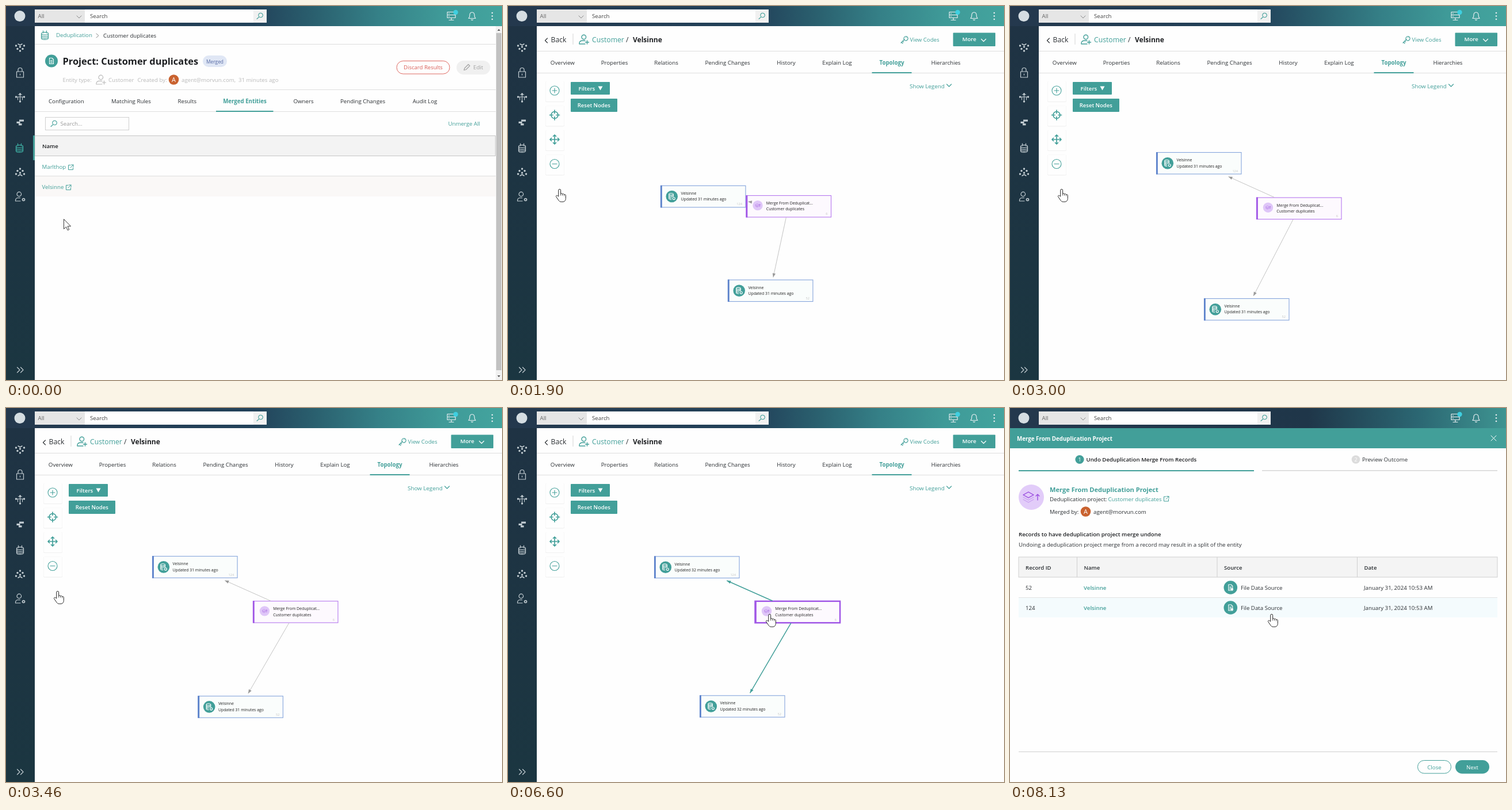
Animation, 862 px wide and 650 px high, one loop 9 s. Source, as an HTML page:

```html
<!DOCTYPE html>
<html lang="en">
<head>
<meta charset="utf-8">
<title>Undo a deduplication merge</title>
<style>
html, body { margin: 0; width: 100%; height: 100%; overflow: hidden; background: #fefefe; }
svg { display: block; width: 862px; height: 650px; font-family: "Open Sans", "Noto Sans", sans-serif; }
text { white-space: pre; }
</style>
</head>
<body>
<svg id="stage" viewBox="0 0 862 650" xmlns="http://www.w3.org/2000/svg"></svg>
<script>
const LOOP = 9000;
const TEAL = '#429f99', INK = '#2b2f33', DARK = '#1d1f22', LINE = '#dedede';
const PERSON = 'Velsinne', EMAIL = 'agent@morvun.com';

// drawing helpers
const text = (x, y, str, { s = 9.7, c = INK, w = 400, a = 'start' } = {}) =>
  `<text x="${x}" y="${y}" font-size="${s}" fill="${c}" font-weight="${w}" text-anchor="${a}">${str}</text>`;
const rect = (x, y, w, h, fill, extra = '') =>
  `<rect x="${x}" y="${y}" width="${w}" height="${h}" fill="${fill}" ${extra}/>`;
const disc = (x, y, r, fill) => `<circle cx="${x}" cy="${y}" r="${r}" fill="${fill}"/>`;
const icon = (x, y, d, c = TEAL, w = 1.2, k = 1) =>
  `<path transform="translate(${x} ${y}) scale(${k})" d="${d}" fill="none" stroke="${c}" stroke-width="${w}" stroke-linecap="round" stroke-linejoin="round"/>`;
const hline = (x1, x2, y, c = LINE, w = 1) => rect(x1, y, x2 - x1, w, c);
const group = (id, body) => `<g id="${id}">${body}</g>`;

const ICON = {
  chevron: 'M-4-2L0 2L4-2',
  lens: 'M-5 5L-1 1.3M-1.3 1A3.8 3.8 0 1 1 1.2 2.3A3.8 3.8 0 0 1-1.3 1',
  db: 'M-6-3a6 2.4 0 0 0 12 0a6 2.4 0 0 0-12 0v8a6 2.4 0 0 0 12 0v-8M-6 0a6 2.4 0 0 0 12 0M-6 2.7a6 2.4 0 0 0 12 0M-3-8v4M3-8v4',
  link: 'M4 1H.5V9H8.5V5.5M5.5.5H9V4M9 .5L4 5.5',
  person: 'M-4-4a3.8 3.8 0 1 0 7.6 0a3.8 3.8 0 1 0-7.6 0M-8 8v-1.5a5 5 0 0 1 5-4.2H2M-8 8H2M5.5 2v6M2.5 5h6',
  admin: 'M-4-4a3.8 3.8 0 1 0 7.6 0a3.8 3.8 0 1 0-7.6 0M-6.5 8v-1.5a4.5 4.5 0 0 1 4.5-4H1.5M-6.5 8H2',
  key: 'M-5 6L1 0M-4 5l2 2M-2 3l1.5 1.5M.5.5a3.6 3.6 0 1 1 1 1zM3.5-3h.1',
  doc: 'M-3.5-5H1L3.5-2.5V5H-3.5zM-1.5-1H1.5M-1.5 1H1.5M-1.5 3H1.5',
  pencil: 'M-5 5L-4 1.5L2.5-5L5-2.5L-1.5 4z',
  lock: 'M-6-2H6V8H-6zM-3.5-2V-5a3.5 3.5 0 0 1 7 0V-2M0 2V4',
  screen: 'M-7-7H7V-2H-7zM-7-2H7V3H-7zM0 3V7M-4 7H4M-4.5-4.5h1M-4.5.5h1',
  bell: 'M-6 4.5C-4 2.5-4 0-4-2a4 4 0 0 1 8 0C4 0 4 2.5 6 4.5zM-1.5 6.5a1.6 1.6 0 0 0 3 0',
  stack: 'M-9-4L0-9L9-4L0 1zM-9 0L0 5L9 0M-9 4L0 9L9 4',
  record: 'M-5-4a3.8 1.6 0 0 0 7.6 0a3.8 1.6 0 0 0-7.6 0V3.5a3.8 1.6 0 0 0 4 1.6M-5-1.5a3.8 1.6 0 0 0 7.6 0M-5 1a3.8 1.6 0 0 0 4 1.6M2.6-4V0M1.5 3.5a2 2 0 1 0 4 0a2 2 0 1 0-4 0',
  close: 'M-4.5-4.5L4.5 4.5M4.5-4.5L-4.5 4.5'
};

const externalLink = (x, y) => icon(x, y, ICON.link, TEAL, 1);
const avatar = (x, y) => disc(x, y, 8.8, '#c9622f') + text(x, y + 4, 'A', { s: 11, c: '#fff', a: 'middle' });

const tabRow = (names, active, y) => names.map(([x, name]) =>
  text(x, y, name, name === active ? { c: TEAL, w: 700, a: 'middle' } : { a: 'middle' })).join('');

const gradient = (id, stops, extra = '') => `<linearGradient id="${id}" ${extra}>` +
  stops.map(([at, c]) => `<stop offset="${at}" stop-color="${c}"/>`).join('') + '</linearGradient>';

function topBar() {
  const soft = '#e6edf0';
  return '<defs>' +
    gradient('barFill', [[0, '#24384d'], [.5, '#22425a'], [.62, '#2a5f6e'], [.75, '#358087'], [.88, '#3f9a98'], [1, '#43a49e']]) +
    gradient('barDim', [[0, '#24384d'], [.6, '#1f3649'], [.82, '#2b6672'], [1, '#3e9491']]) +
    gradient('sideFill', [[0, '#1f3344'], [1, '#1b3641']], 'x2="0" y2="1"') + '</defs>' +
    rect(0, 0, 862, 35, 'url(#barFill)') + rect(0, 0, 862, 35, 'url(#barDim)', 'id="dimBar"') +
    disc(24, 17.5, 9.5, '#d5dde2') +
    rect(50, 6, 87, 23, '#e6e6e6') + rect(137, 6, 293, 23, '#fefefe') + rect(430, 6, 23, 23, '#f1f1f1') +
    text(55.5, 21, 'All', { c: '#666' }) + icon(127, 19, ICON.chevron, '#888', 1) +
    text(146, 21.3, 'Search', { c: '#444' }) + icon(441, 17.5, ICON.lens, TEAL, 1.1) +
    icon(774, 17.5, ICON.screen, soft, 1.2) + icon(810, 17, ICON.bell, soft, 1.2) +
    [12, 17.5, 23].map(y => disc(845, y, 1.3, soft)).join('') +
    '<circle id="dot" cx="781.5" cy="11" r="4.2" fill="#3fcfe0"/>';
}

function sideBar() {
  const c = '#c4ced3', x = 24.5;
  const dots = (y, pts) => pts.map(([dx, dy]) => disc(x + dx, y + dy, 1.7, c)).join('');
  const fan = (y, dir) => dots(y, [[0, -6], [-4.5, -2.5], [4.5, -2.5], [-7, 3], [7, 3], [0, 1]].map(([dx, dy]) => [dx, dy * dir])) +
    icon(x, y, `M-3.5 ${6 * dir}L0 ${4 * dir}L3.5 ${6 * dir}`, c, 1.5);
  return rect(0, 35, 50, 615, 'url(#sideFill)') +
    fan(72, -1) + icon(x, 116, ICON.lock, c, 1.2) +
    icon(x, 159, 'M-8-1H8M0-6V7M-4-1V4M4-1V4M-3-5H3', c, 1.1) + dots(159, [[0, -6], [-7, -1], [7, -1], [0, 7]]) +
    rect(23, 197.5, 8, 3.2, c) + rect(18.5, 200.8, 6, 3.2, c) + rect(22, 204.2, 5.5, 3.2, c) +
    group('dbActive', rect(47, 225, 3, 43, TEAL) + icon(23.5, 247, ICON.db, '#3fb0a5', 1.2)) +
    group('dbIdle', icon(x, 247, ICON.db, c, 1.2)) +
    fan(289, 1) + icon(23, 331, ICON.admin, c, 1.2) +
    icon(30.5, 336.5, 'M-2 0a2 2 0 1 0 4 0a2 2 0 1 0-4 0', c, 1.6) +
    icon(x, 632.5, 'M-5-4.5L-.5 0L-5 4.5M1-4.5L5.5 0L1 4.5', c, 1.2);
}

function listPage() {
  const pale = { c: '#b9b9b9' }, teal = { c: TEAL };
  return rect(50, 35, 812, 615, '#fefefe') +
    icon(67.5, 51, ICON.db, TEAL, 1.2) + text(87, 54.3, 'Deduplication', teal) +
    icon(159, 51.5, 'M-2-3.5L2 0L-2 3.5', '#888', 1) + text(169, 54.5, 'Customer duplicates', { s: 9.6 }) +
    hline(50, 851, 66) +
    disc(79, 95.5, 11, TEAL) + icon(79, 95.5, ICON.doc, '#fff', 1.1) +
    text(98.5, 101.5, 'Project: Customer duplicates', { s: 16.4, w: 700, c: DARK }) +
    rect(342, 86, 42, 20, '#e0e7f5', 'rx="10"') + text(363, 99.5, 'Merged', { s: 8.4, c: '#5468a3', a: 'middle' }) +
    text(98.5, 132, 'Entity type:', pale) + icon(165, 128, ICON.person, '#b9b9b9', 1.2) + text(178, 132, 'Customer', pale) +
    text(228.5, 132, 'Created by:', pale) + avatar(291.5, 128) +
    text(305, 132, EMAIL + ',', pale) + text(404, 132, '31 minutes ago', pale) +
    rect(679, 95.5, 92, 22.5, '#fefefe', 'rx="11.2" stroke="#df6a62"') + text(725, 110.3, 'Discard Results', { s: 9.55, c: '#d95c55', a: 'middle' }) +
    rect(783, 95, 58.5, 24, '#f0f0f0', 'rx="12"') + icon(801, 106.5, ICON.pencil, '#a2a2a2', 1.2) + text(812, 110.3, 'Edit', { c: '#a2a2a2' }) +
    hline(50, 851, 145) +
    tabRow([[104.8, 'Configuration'], [217.5, 'Matching Rules'], [314.8, 'Results'], [415, 'Merged Entities'], [517, 'Owners'], [620, 'Pending Changes'], [728, 'Audit Log']], 'Merged Entities', 168.8) +
    hline(50, 851, 183) + hline(365, 464.5, 182, TEAL, 2) +
    rect(68.5, 193.5, 145, 22, '#fefefe', 'stroke="#d0d0d0"') + icon(83, 204.5, ICON.lens, TEAL, 1.1) + text(94.5, 208, 'Search...', { c: '#999' }) +
    text(824, 208, 'Unmerge All', { c: TEAL, a: 'end' }) +
    rect(50, 225.5, 800.5, 35, '#f3f3f3', 'stroke="#c6c6c6"') + text(63, 247, 'Name', { s: 9.6, w: 600, c: DARK }) +
    text(62.5, 283.3, 'Marlthop', teal) + externalLink(108, 275.5) + hline(50, 851, 295) +
    rect(50, 296, 801, 35, '#faf8f7') + text(62.5, 318.3, PERSON, teal) + externalLink(104, 310.5) +
    rect(851, 35, 11, 615, '#f1f1f1') + rect(852, 47, 9, 586, '#c1c1c1') +
    '<path d="M854 43h5l-2.500-3zM854 642h5l-2.500 3z" fill="#505050"/>';
}

function entityHeader() {
  return icon(66.5, 60, 'M2-4L-2 0L2 4', INK, 1.1) + text(74.5, 62.8, 'Back', { s: 12.2 }) + rect(112.5, 48, 1, 19, '#d4d4d4') +
    icon(132, 58, ICON.person, TEAL, 1.4) + text(146, 62.8, 'Customer', { s: 12.2, c: TEAL }) +
    text(205, 62.8, '/', { s: 12.2 }) + text(217, 62.8, PERSON, { s: 12, w: 700, c: DARK }) +
    icon(688, 58, ICON.key, TEAL, 1.2) + text(698.5, 61.5, 'View Codes', { s: 9.6, c: TEAL }) +
    rect(773.5, 46.5, 73.5, 23.5, TEAL, 'rx="1"') + text(789.5, 61, 'More', { w: 600, c: '#fff' }) + icon(826.5, 59.5, ICON.chevron, '#fff', 1.2) +
    hline(50, 862, 78) +
    tabRow([[94.8, 'Overview'], [185, 'Properties'], [275, 'Relations'], [381.5, 'Pending Changes'], [483.5, 'History'], [572, 'Explain Log'], [667, 'Topology'], [761, 'Hierarchies']], 'Topology', 101.5) +
    hline(50, 862, 116) + hline(632.5, 701.5, 115, TEAL, 2);
}

function graphTools() {
  const ring = 'M-8 0a8 8 0 1 0 16 0a8 8 0 1 0-16 0';
  const signs = [ring + 'M-4 0H4M0-4V4', 'M-6 0a6 6 0 1 0 12 0a6 6 0 1 0-12 0M-8.5 0H-3M3 0H8.5M0-8.5V-3M0 3V8.5',
    'M-8 0H8M0-8V8M-2.5-5.5L0-8L2.5-5.5M-2.5 5.5L0 8L2.5 5.5M-5.5-2.5L-8 0L-5.5 2.5M5.5-2.5L8 0L5.5 2.5', ring + 'M-4 0H4'];
  return signs.map((d, i) => {
    const y = 147 + i * 42.5;
    return rect(65, y - 16, 33, 36, '#f0f0f0', 'rx="2"') + rect(65.5, y - 16, 32, 35, '#fefefe', 'rx="2"') + icon(81, y, d, TEAL, i % 3 ? 1.7 : 1.1);
  }).join('') +
    rect(109, 132, 68, 22, TEAL, 'rx="1"') + text(122.5, 146.7, 'Filters', { w: 600, c: '#fff' }) + '<path d="M156.500 139.500h8l-4 7z" fill="#fff"/>' +
    rect(109, 161, 81, 23, TEAL, 'rx="1"') + text(149.3, 176, 'Reset Nodes', { s: 9.5, w: 600, c: '#fff', a: 'middle' }) +
    text(698, 142.7, 'Show Legend', { s: 9.8, c: TEAL }) + icon(766.5, 138, ICON.chevron, TEAL, 1.2);
}

function dialog() {
  const mid = { a: 'middle' };
  const row = (y, id) => text(27, y + 3.6, id) + text(128, y + 3.6, PERSON, { c: TEAL, w: 600 }) +
    disc(383.3, y, 11.8, TEAL) + icon(383.3, y, ICON.doc, '#fff', 1.1) + disc(386, y + 3, 2, '#fff') +
    text(401, y + 3.6, 'File Data Source') + text(615, y + 3.6, 'January 31, 2024 10:53 AM');
  return rect(0, 35, 862, 615, '#fefefe') + rect(0, 35, 862, 35, TEAL) +
    text(12, 57, 'Merge From Deduplication Project', { s: 9.75, w: 700, c: '#fff' }) +
    icon(840.5, 52.5, ICON.close, '#fff', 1) +
    hline(15, 847, 597, '#d0d0d0') +
    rect(708.5, 612.5, 58, 22.5, '#fefefe', `rx="11.2" stroke="${TEAL}"`) + text(737.5, 627.7, 'Close', { c: TEAL, ...mid }) +
    rect(774, 612, 59, 23.5, TEAL, 'rx="11.7"') + text(803.5, 627.7, 'Next', { c: '#fff', ...mid }) +
    group('dialogBody',
      disc(121, 89.5, 7.6, TEAL) + text(121, 92.8, '1', { s: 9, c: '#fff', ...mid }) +
      text(132.5, 93.3, 'Undo Deduplication Merge From Records', { w: 600, c: DARK }) +
      disc(601, 89.5, 7.3, '#dcdcdc') + text(601, 92.8, '2', { s: 9, c: '#fff', ...mid }) + text(612, 93.3, 'Preview Outcome') +
      hline(15, 424, 108, TEAL, 2) + hline(438, 847, 108, '#d6d6d6', 1.5) +
      disc(37, 155, 22, '#e2ccf9') + icon(32, 155, ICON.stack, '#c9a0f0', 1.3) + icon(32, 155, 'M-9-4L0-9L9-4L0 1z', '#9b4fe0', 1.4) + icon(48, 155, 'M0 5V-5M-3-2L0-5L3-2', '#9b4fe0', 1.4) +
      text(69, 145.5, 'Merge From Deduplication Project', { s: 11.1, w: 700, c: TEAL }) +
      text(69, 162, 'Deduplication project:') + text(170.5, 162, 'Customer duplicates', { c: TEAL }) + externalLink(267, 153) +
      text(69, 184.3, 'Merged by:') + avatar(131.5, 180) + text(145, 184.3, EMAIL) +
      text(15, 222.5, 'Records to have deduplication project merge undone', { w: 600, c: DARK }) +
      text(15, 241, 'Undoing a deduplication project merge from a record may result in a split of the entity') +
      rect(15, 259, 832, 35, '#f4f4f4', 'stroke="#cfcfcf"') +
      [116, 359.5, 603].map(x => rect(x, 259, 1, 35, '#cfcfcf')).join('') +
      [[27, 'Record ID'], [128.5, 'Name'], [372, 'Source'], [615.5, 'Date']].map(([x, s]) => text(x, 280.6, s, { s: 9.6, w: 600 })).join('')) +
    group('dialogRows', hline(15, 847, 329, '#e2e2e2') + rect(15, 330, 832, 34, '#f4fbfd') + row(312, '52') + row(347, '124'));
}

// graph
const NODE_W = 148, NODE_H = 38.5;
const NODES = {
  first: { id: 124, path: [[1900, 265, 312], [2360, 238, 246], [2800, 251, 252.5], [3000, 254, 254], [3600, 254, 257.5]], push: [-26, 2] },
  second: { id: 52, path: [[1900, 382, 475.5], [2360, 332, 494], [2800, 338, 508], [3000, 337, 508], [3600, 333, 499.3]], push: [-3, 10] },
  merge: { id: 6, path: [[1900, 413.5, 329], [2360, 417.5, 304], [2800, 426.5, 328], [3000, 428, 332.5], [3600, 429, 335.3]], push: [16, 1] }
};

const clamp01 = v => Math.min(1, Math.max(0, v));
const smooth = v => v * v * (3 - 2 * v);

// Hermite curve through timed points, coming to rest at the last one
function spline(keys, t) {
  const last = keys.length - 1;
  if (t >= keys[last][0]) return keys[last].slice(1);
  let i = 0;
  while (i < last - 1 && t >= keys[i + 1][0]) i++;
  const span = keys[i + 1][0] - keys[i][0], u = clamp01((t - keys[i][0]) / span);
  const slope = (k, d) => {
    if (k === last) return 0;
    const a = keys[Math.max(0, k - 1)], b = keys[k + 1];
    return (b[d] - a[d]) / (b[0] - a[0]);
  };
  return [1, 2].map(d => {
    const h = smooth(u);
    return keys[i][d] * (1 - h) + keys[i + 1][d] * h +
      span * (u * (1 - u) * (1 - u) * slope(i, d) - u * u * (1 - u) * slope(i + 1, d));
  });
}

function glide(keys, t) {
  const k = keys.findIndex(key => t < key[0]);
  if (k === 0) return keys[0].slice(1);
  if (k < 0) return keys[keys.length - 1].slice(1);
  const a = keys[k - 1], b = keys[k], u = smooth((t - a[0]) / (b[0] - a[0]));
  return [a[1] + (b[1] - a[1]) * u, a[2] + (b[2] - a[2]) * u];
}

function nodePosition(node, t) {
  const [x, y] = spline(node.path, t), u = 1 - (1 - clamp01((t - 7060) / 300)) ** 2;
  return [x + node.push[0] * u, y + node.push[1] * u];
}

function drawNode(node, [x, y], minutes, hover) {
  const merge = node === NODES.merge;
  const edge = merge ? (hover ? '#a056e6' : '#b678ee') : '#86a5dc';
  const lines = merge ? ['Merge From Deduplicat...', 'Customer duplicates'] : [PERSON, `Updated ${minutes} minutes ago`];
  const badge = merge
    ? disc(20.5, 17.7, 8.7, '#dfc6f8') + icon(19.5, 17.7, ICON.stack, '#b57ce8', 1.8, .33) + icon(24, 17.7, 'M0 2V-2M-1-1L0-2L1-1', '#a565df', .7)
    : disc(19.8, 19.2, 10.3, TEAL) + icon(19.8, 19.2, ICON.record, '#fff', 1.1);
  const tx = merge ? 35.3 : 35.5;
  return `<g transform="translate(${x} ${y})">` +
    rect(.5, .5, NODE_W - .5, NODE_H - 1, merge ? '#fdf9fe' : '#fafdfc', `stroke="${edge}" stroke-width="${hover ? 2.5 : 1.1}"`) +
    rect(0, 0, 2.8, NODE_H, merge ? '#a056e6' : '#5c82cb') + badge +
    text(tx, 16.2, lines[0], { s: 6.9, c: '#222' }) + text(tx, 26.5, lines[1], { s: 6.9, c: '#222' }) +
    text(142, 34.5, node.id, { s: 5.6, c: '#c4c4c4', a: 'end' }) + '</g>';
}

function drawEdge(from, to, hover) {
  const cx = NODE_W / 2, cy = NODE_H / 2;
  const dx = to[0] - from[0], dy = to[1] - from[1];
  const exit = gap => Math.min((cx + gap) / Math.abs(dx), (cy + gap) / Math.abs(dy));
  const at = u => [from[0] + cx + dx * u, from[1] + cy + dy * u];
  const start = exit(0), end = 1 - exit(4), a = at(start), tip = at(end);
  const shaft = start < end ? `<path d="M${a}L${tip}" stroke="${hover ? TEAL : '#c3c3c3'}" stroke-width="${hover ? 1.5 : 1}"/>` : '';
  const angle = Math.atan2(dy, dx) * 180 / Math.PI;
  return shaft + `<path transform="translate(${tip}) rotate(${angle})" d="M0 0L-7-2.700V2.700z" fill="${hover ? TEAL : '#999'}"/>`;
}

const ARROW = '<path d="M.5.5V17.5L4.5 13.8L7.2 19.7L9.7 18.6L7.1 12.8H12.5z" fill="#fff" stroke="#222" stroke-width=".9" stroke-linejoin="round"/>';
const HAND = '<path d="M-2.2 13V2.3a1.9 1.9 0 0 1 3.8 0V8.6a1.7 1.7 0 0 1 3.1.5a1.7 1.7 0 0 1 3 .8a1.6 1.6 0 0 1 2.6 1.2v5.2c0 3.6-1.8 6-5.4 6H2.3c-2.4 0-3.5-1.2-4.9-3.4L-6.2 13.7c-1.2-1.9.9-3.3 2.3-1.9z" fill="#fff" stroke="#222" stroke-linejoin="round"/><path d="M1.6 8.5v3M4.7 9.3v2.4M7.7 10.3v2" stroke="#222" stroke-width=".8"/>';
const CURSOR = [[260, 100, 370], [720, 75, 312], [960, 90, 318], [5630, 90, 318], [6600, 455, 358]];

const stage = document.getElementById('stage');
stage.innerHTML = rect(0, 0, 862, 650, '#fefefe') + topBar() + sideBar() +
  group('list', listPage()) + group('header', entityHeader()) + group('tools', graphTools()) + group('graph', '') +
  group('dialog', dialog()) +
  group('status', rect(0, 634, 286, 16, '#e9ebee', 'stroke="#c8c8c8"') + text(5, 645.5, 'https://localhost/app/entities/customer/124/topology', { s: 9, c: '#555' })) +
  group('cursor', group('arrow', ARROW) + group('hand', HAND));

const part = id => document.getElementById(id);
const show = (id, on) => part(id).setAttribute('opacity', Number(on));

// keep the active marker above the page it belongs to
stage.insertBefore(part('dbActive'), part('header'));

function render(t) {
  const listing = t < 1600, graphing = t >= 1900 && t < 7830;
  const fade = clamp01((t - 7660 + 35) / 205) * (t >= 7660);
  show('list', listing);
  show('dbActive', listing);
  show('dbIdle', !listing);
  show('header', t >= 1660);
  show('tools', t >= 1900);
  show('dot', listing || (t >= 1900 && t < 7660) || t >= 8030);
  show('dialog', fade);
  show('dimBar', fade);
  show('dialogBody', t >= 8030);
  show('dialogRows', t >= 8130);
  show('status', t >= 1200 && t < 1430 ? (t < 1230 || t >= 1400 ? .5 : 1) : 0);

  const [x, y] = glide(CURSOR, t);
  const hover = t >= 5630 && x >= 429;
  const hand = (t >= 720 && t < 4730) || hover;
  part('cursor').setAttribute('transform', `translate(${x} ${y})`);
  show('hand', hand);
  show('arrow', !hand);

  let body = '';
  if (graphing) {
    const minutes = t < 6000 ? 31 : 32;
    const { first, second, merge } = NODES;
    const [a, b, m] = [first, second, merge].map(node => nodePosition(node, t));
    body = drawNode(first, a, minutes) + drawNode(second, b, minutes) + drawNode(merge, m, minutes, hover) +
      drawEdge(m, a, hover) + drawEdge(m, b, hover);
  }
  part('graph').innerHTML = body;
}

const begin = performance.now();
function tick() {
  render((performance.now() - begin) % LOOP);
  requestAnimationFrame(tick);
}
tick();
</script>
</body>
</html>
```
